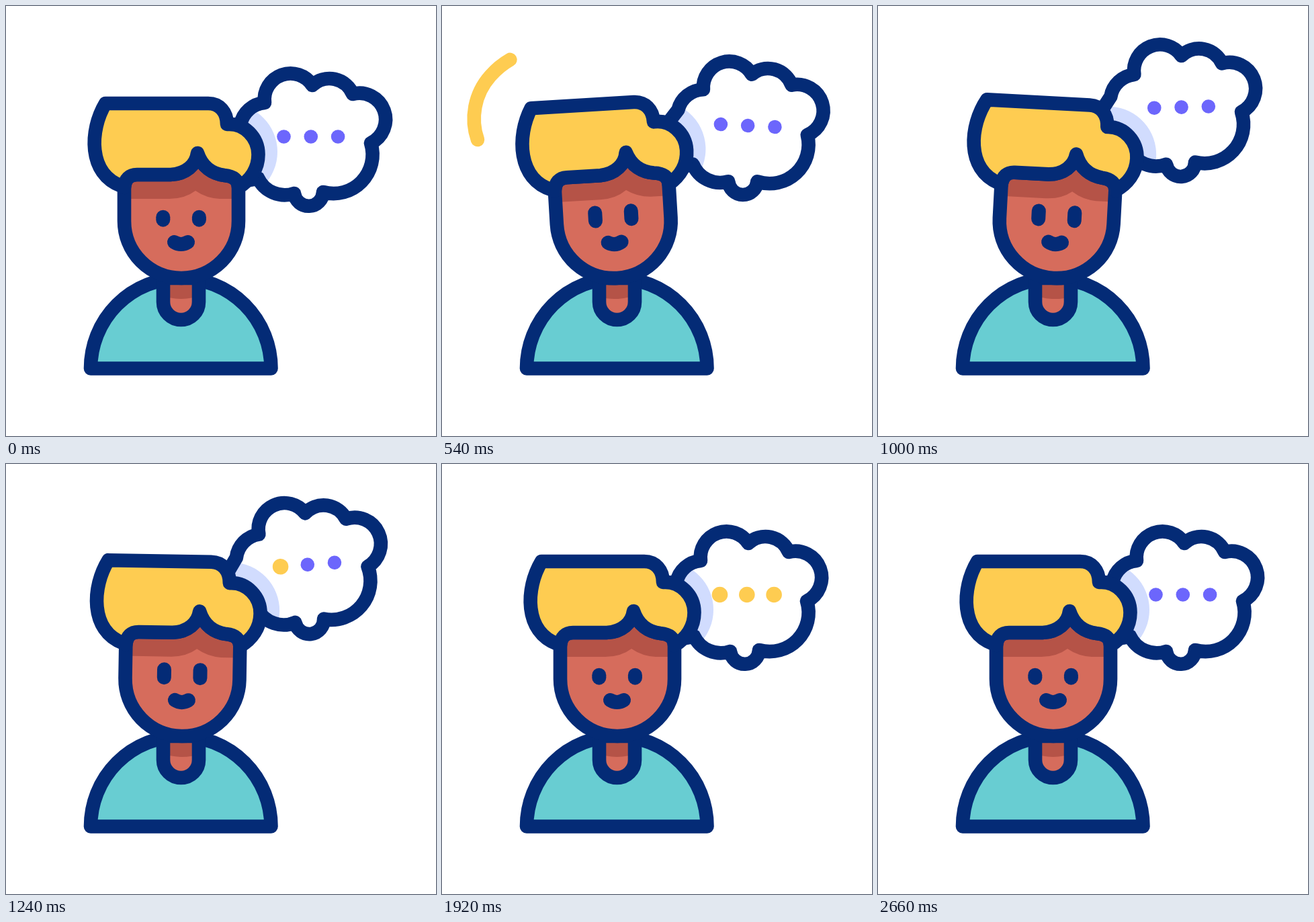
An HTML page with a canvas that plays this animation: 640x640 px, repeating every 2720 ms.

```html
<!DOCTYPE html>
<html lang="en">
<head>
<meta charset="utf-8">
<title>Thinking person</title>
<style>
  html, body { margin: 0; width: 100%; height: 100%; overflow: hidden; background: #fff; }
  canvas { display: block; }
</style>
</head>
<body>
<canvas id="stage" width="640" height="640"></canvas>
<script>
const ctx = document.getElementById('stage').getContext('2d');
const LOOP = 2720;
const NAVY = '#042b76', YELLOW = '#fecc51', SKIN = '#d66c5c', SKIN_SHADE = '#b55347';
const TEAL = '#68cdd2', LILAC = '#d1dcfe';
const PURPLE_RGB = [108, 102, 252], YELLOW_RGB = [254, 204, 81];

const bubble = new Path2D(`M385 144A38.8 38.8 0 0 1 456 118A37.5 37.5 0 0 1 516 131
  A39.1 39.1 0 0 1 543 204A58 58 0 0 1 472 277A21.6 21.6 0 0 1 429 279
  A44 44 0 0 1 375 256C362 261 345 261 330 255L322 215L349 176A40 40 0 0 1 385 144Z`);
const fringe = 'Q178 251 195 251L245 251C268 250 283 236 285 219C292 240 308 250 325 252Q346 254 346 270';
const face = new Path2D(`M176 270${fringe}L346 320A85 85 0 0 1 176 320Z`);
const hair = new Path2D(`M176 270${fringe}C364 259 375.5 242 375.5 221
  C375.5 196 355 174 329 176C329 158 318 145 301 145L148 145C124 185 122 250 172 268Z`);
const faceShade = new Path2D('M170 200H352V287H318Q298 286 282 275Q266 287 243 287H170Z');
const mouth = new Path2D('M250.5 351.5Q260.5 357.5 270.5 351.5');
const shirt = new Path2D('M126 539.5A134.25 134.25 0 0 1 394.5 539.5Z');
const neck = new Path2D('M234 405V440.5A26.5 26.5 0 0 0 287 440.5V405Z');
const swoosh = new Path2D('M191 74C150 58 105 67 72 104C48 131 42 168 53 199');
const SWOOSH_LENGTH = 233;

// Each ray: start x, start y, end x, end y
const rays = [[268, 95, 246, 46], [319, 88, 325, 41], [359, 119, 386, 89]];

// Keyframes: [time, value]
const headTilt = [[200, 0], [400, -6.8], [780, 4.1], [1450, 0]];
const bubbleTilt = [[360, 0], [680, 4.7], [1200, -4.6], [1560, 3.8], [1800, 0]];
const bubbleX = [[780, 0], [1220, -3], [1620, 0]];
const bubbleY = [[200, 0], [1020, -44], [1200, -44], [1320, -47], [1730, 0]];
const eyeHeight = [[200, 4], [340, 12], [560, 12], [720, 1], [780, 1], [960, 12],
  [1300, 12], [1600, 2], [1680, 2], [1800, 4]];

function ease(t, start, end) {
  const u = Math.min(1, Math.max(0, (t - start) / (end - start)));
  return u * u * (3 - 2 * u);
}

function track(keys, t) {
  let value = keys[0][1];
  for (let i = 1; i < keys.length; i++) {
    value += (keys[i][1] - keys[i - 1][1]) * ease(t, keys[i - 1][0], keys[i][0]);
  }
  return value;
}

function rotateAbout(x, y, degrees) {
  ctx.translate(x, y);
  ctx.rotate(degrees * Math.PI / 180);
  ctx.translate(-x, -y);
}

function scoped(draw) {
  ctx.save();
  draw();
  ctx.restore();
}

function fill(path, color) {
  ctx.fillStyle = color;
  ctx.fill(path);
}

function stroke(path, color = NAVY, width = 20.6) {
  ctx.strokeStyle = color;
  ctx.lineWidth = width;
  ctx.stroke(path);
}

function disc(x, y, r, color) {
  const path = new Path2D();
  path.arc(x, y, r, 0, 7);
  fill(path, color);
}

function line(x1, y1, x2, y2, color, width) {
  const path = new Path2D();
  path.moveTo(x1, y1);
  path.lineTo(x2, y2);
  stroke(path, color, width);
}

function drawSwoosh(t) {
  const head = ease(t, 200, 500), tail = ease(t, 340, 805);
  if (head <= tail) return;
  scoped(() => {
    ctx.setLineDash([(head - tail) * SWOOSH_LENGTH, 999]);
    ctx.lineDashOffset = -tail * SWOOSH_LENGTH;
    stroke(swoosh, YELLOW);
  });
}

function drawRays(t) {
  const head = ease(t, 2140, 2540), tail = ease(t, 2360, 2650);
  if (head <= tail) return;
  for (const [x1, y1, x2, y2] of rays) {
    const dx = x2 - x1, dy = y2 - y1;
    line(x1 + dx * tail, y1 + dy * tail, x1 + dx * head, y1 + dy * head, YELLOW, 21);
  }
}

function drawBubble(t, tiltHead) {
  const place = () => {
    ctx.translate(track(bubbleX, t), track(bubbleY, t));
    rotateAbout(454, 222, track(bubbleTilt, t));
  };
  scoped(() => {
    place();
    fill(bubble, '#fff');
    ctx.clip(bubble);
    ctx.setTransform(1, 0, 0, 1, 0, 0);
    tiltHead();
    disc(332.5, 217, 71.5, LILAC);
  });
  scoped(() => {
    place();
    stroke(bubble);
    for (let i = 0; i < 3; i++) {
      const on = 1100 + i * 320;
      const glow = ease(t, on, on + 140) - ease(t, 2020, 2170);
      const color = PURPLE_RGB.map((c, k) => Math.round(c + (YELLOW_RGB[k] - c) * glow));
      disc(413.5 + i * 40.3, 194.5, 10.3 + 1.5 * glow, `rgb(${color})`);
    }
  });
}

function drawBody(tiltHead) {
  fill(shirt, TEAL);
  stroke(shirt);
  fill(neck, SKIN);
  scoped(() => {
    ctx.clip(neck);
    tiltHead();
    disc(260.5, 351, 85, SKIN_SHADE);
  });
  stroke(neck);
}

function drawHead(t) {
  fill(face, SKIN);
  scoped(() => {
    ctx.clip(face);
    fill(faceShade, SKIN_SHADE);
  });
  stroke(face);
  fill(hair, YELLOW);
  stroke(hair);
  const eyeTop = 318.2 - track(eyeHeight, t);
  for (const x of [233.8, 287.4]) line(x, 318.2, x, eyeTop, NAVY, 21);
  stroke(mouth, NAVY, 21);
}

function render(t) {
  const tiltHead = () => rotateAbout(260.5, 409, track(headTilt, t));
  ctx.fillStyle = '#fff';
  ctx.fillRect(0, 0, 640, 640);
  drawSwoosh(t);
  drawRays(t);
  drawBubble(t, tiltHead);
  drawBody(tiltHead);
  scoped(() => {
    tiltHead();
    drawHead(t);
  });
}

ctx.lineCap = ctx.lineJoin = 'round';
const began = performance.now();
function tick() {
  render((performance.now() - began) % LOOP);
  requestAnimationFrame(tick);
}
tick();
</script>
</body>
</html>
```
